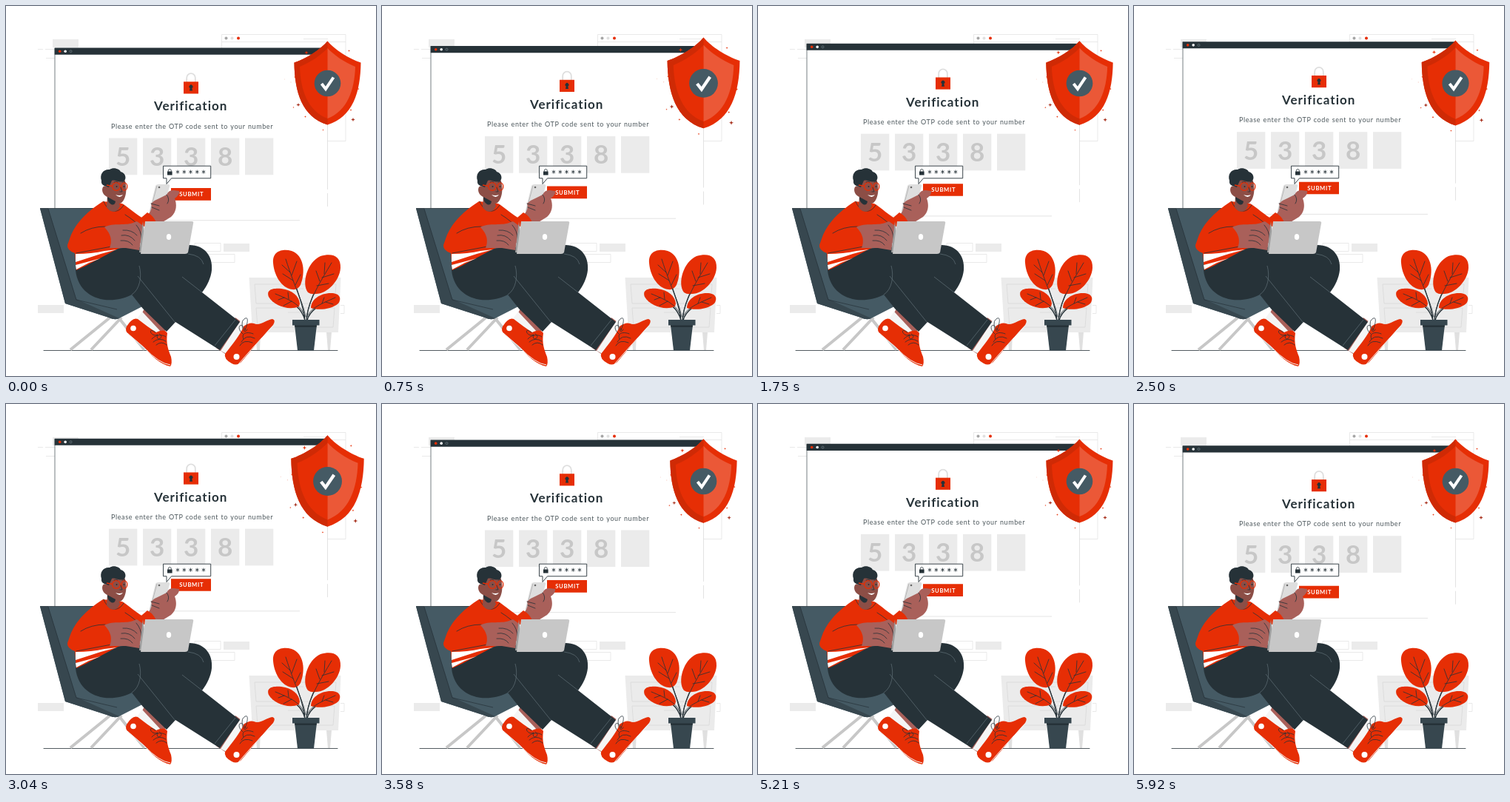
Animation of 500x500 px, one loop 5960 ms. Source, as an HTML page:

```html
<!DOCTYPE html>
<html lang="en">
<head>
<meta charset="utf-8">
<title>Verification</title>
<style>
  html, body { margin: 0; width: 100%; height: 100%; overflow: hidden; background: #fff; }
  svg { display: block; width: 100vw; height: 100vh; }
  text { font-family: Lato, "Open Sans", sans-serif; }
  .red { fill: #e62e05; }
  .dark { fill: #263238; }
  .slate { fill: #37474f; }
  .skin { fill: #a9605a; }
  .pale { fill: #ebebeb; }
  .white { fill: #fff; }
  .line { fill: none; stroke: #263238; stroke-width: .8; stroke-linecap: round; stroke-linejoin: round; }
  .faint { fill: none; stroke: #e4e4e4; stroke-width: .8; }
</style>
</head>
<body>
<svg viewBox="0 0 500 500">
  <g id="backdrop">
    <path class="pale" d="M63 45h35v11H63zM43 404h35v11H43zM294 321h35v11h-35z"/>
    <path class="faint" d="M43 58.5h7M53 58.5h13M54 70.5h12M255 320.5h35v11h-35zM270 335.5h39v11h-39zM452 404.5h5v11h-5"/>
    <path class="faint" d="M291.5 38.5H459V182.5H291.5zM291.5 48.5H459M402 44.5h33"/>
    <circle cx="297.500" cy="43.500" r="2" fill="#a6a6a6"/>
    <circle cx="305.500" cy="43.500" r="2" fill="#e0e0e0"/>
    <circle cx="314" cy="43.500" r="2" class="red"/>
    <path fill="#e0e0e0" d="M337 441h7l-1 24h-4zM433 441h7l-2 24h-3z"/>
    <path class="pale" d="M328.500 367H452.500L449 441H333z"/>
    <path fill="none" stroke="#d8d8d8" stroke-width=".8" d="M336 376H446L444 402H338zM338 408H444L442 434H340zM380 382h22M381 414h20"/>
    <path class="line" d="M51 465.500H448" stroke-width=".6"/>
  </g>

  <g id="panel">
    <path class="white" d="M66 57H434.500V290H66z"/>
    <path fill="none" stroke="#dcdcdc" stroke-width=".8" d="M434.500 66V248M434.500 253V271M66 289.700H397"/>
    <path fill="none" stroke="#555f64" stroke-width=".8" d="M66 57V290"/>
    <path class="dark" d="M65.700 56.500H434.500v9.200H65.700z"/>
    <circle cx="72.700" cy="61.200" r="1.800" class="red"/>
    <circle cx="80.200" cy="61.200" r="1.800" class="white"/>
    <circle cx="87.500" cy="61.200" r="1.500" fill="none" stroke="#6d7b82" stroke-width=".8"/>
    <path fill="none" stroke="#dedede" stroke-width="1.800" d="M244.200 103V97a5.800 5.800 0 0 1 11.600 0v6"/>
    <path class="red" d="M240 102.300h20v16.200h-20z"/>
    <path class="dark" d="M248.700 111a2.400 2.400 0 1 1 2.600 0l.7 3.600h-4z"/>
    <text class="dark" x="200" y="141.500" font-size="17" font-weight="700" letter-spacing="1">Verification</text>
    <text x="142" y="165.700" font-size="9" fill="#4a555a" letter-spacing=".62" word-spacing=".5">Please enter the OTP code sent to your number</text>
    <g id="digits" font-size="35" font-weight="700" text-anchor="middle"></g>
    <path class="red" d="M223 246h54v16.700h-54z"/>
    <text class="white" x="234.200" y="257.200" font-size="7.700" font-weight="700" letter-spacing=".65">SUBMIT</text>
  </g>

  <g id="chair">
    <path fill="none" stroke="#c7c7c7" stroke-width="4" d="M143 419L87 464.500M156 421L115 464.500M152 421L187 464.500"/>
    <path fill="#455a64" d="M46 273.500L124 273C140 275 153 285 160 300L196 400L153 422Q147 425 139 421L80 402z"/>
    <path class="slate" d="M46 273.500H57L95 396L153 422Q147 425 139 421L80 402z"/>
    <path fill="none" stroke="#263238" stroke-width=".7" d="M46 273.500H124M57 274L95 397L150 410"/>
  </g>

  <g id="person">
    <path class="skin" d="M188 407L217 436L207 450L178 426z"/>
    <path fill="#f5f5f5" d="M184 413L211 442L205 453L173 428z"/>
    <path class="red" d="M163 433Q171 420 178 423C187 430 195 436 203 441C209 438 215 437 218 442C216 455 219 464 223 474Q225 483 222 487C209 485 196 472 184 459L166 444Q160 439 163 433z"/>
    <path fill="none" stroke="#f5f5f5" stroke-width="1" d="M164 442L187 462Q207 483 222 485"/>
    <circle cx="172" cy="435.500" r="3.800" class="white"/>
    <path class="line" d="M197 450C203 443 212 444 216 447M199 454Q207 447 216 453M203 458Q210 452 217 458M202 441C190 432 196 449 205 444C201 455 216 448 207 443" stroke-width="1.200"/>

    <path class="skin" d="M310 421L322 430L296 470L284 462z"/>
    <path fill="#f5f5f5" d="M317 425L329 433L304 473L290 466z"/>
    <path class="red" d="M296 470C306 457 317 444 321 433Q329 427 335 429C343 433 352 424 360 423Q365 424 361 431C347 446 332 465 318 481Q312 487 305 483Q294 477 296 470z"/>
    <path fill="none" stroke="#f5f5f5" stroke-width="1" d="M314 484Q331 464 361 432"/>
    <circle cx="311.500" cy="474" r="4" class="white"/>
    <path class="line" d="M321 450C317 441 327 440 334 443M318 454Q324 443 336 449M316 459Q321 450 333 455M320 443C309 434 319 425 323 438C329 422 326 418 320 425C317 433 322 445 326 437" stroke-width="1.200"/>

    <path class="dark" d="M94 357C107 342 135 329 166 326L246 323C267 322 280 337 278 357C277 367 272 378 265 387L316 427L289 465L229 427L217 440L185 409L170 390C139 406 98 396 94 357z"/>
    <path fill="none" stroke="#607078" stroke-width=".7" d="M170 390C181 383 184 365 180 351M178 365L228 427M246 335Q264 337 267 349M265 387L238 366M282 459L310 424"/>

    <path class="red" d="M131 264C112 276 96 291 88 309L83 323Q82 330 93 334L95 357L108 351L151 328L185 319L184 297L193 291C180 286 166 272 157 267z"/>
    <path class="white" d="M94 335Q116 335 133 331L150 329L128 335L94 346z"/>
    <path class="white" d="M94 350L128 341L112 347L95 356z"/>
    <path class="line" d="M132 264C137 278 151 283 159 269M101 307Q115 298 134 298M95 334L148 324M161 282Q174 290 183 300"/>
    <path class="skin" d="M133 299C145 292 162 298 174 292Q181 289 186 295L180 330L162 327L140 327Q146 312 133 299z"/>
    <path class="line" d="M158 303Q170 302 177 310M156 310Q167 308 174 317M155 317Q166 316 171 323M176 296Q183 304 183 314" stroke-width=".6"/>

    <path fill="#8c4e46" d="M137 256L136 272C142 281 151 279 154 270L151 263z"/>
    <path fill="#8c4e46" d="M137 231L159 232C164 241 164 259 156 266Q151 269 145 265L137 258C127 254 129 240 136 244z"/>
    <path class="dark" d="M137 258L148 264Q147 270 142 268Q137 265 137 258z"/>
    <path class="dark" d="M129 236C126 227 132 220 140 221C146 217 154 221 155 224C161 225 164 233 159 237C152 239 147 234 143 236L139 245L133 243Q128 241 129 236z"/>
    <g fill="none" stroke="#e62e05" stroke-width="1.300">
      <circle cx="149" cy="244" r="5.300"/><ellipse cx="160" cy="244" rx="3.800" ry="5.200"/><path d="M136 242L144 243.500"/>
    </g>
    <path class="line" d="M146 238q3-2 5 0M157 238q3-1 4 0M155 245l2 6l-3 0" stroke-width=".7"/>
    <circle cx="149.500" cy="244" r="1" class="dark"/><circle cx="159.500" cy="244" r="1" class="dark"/>
    <path class="white" d="M148 255q5 2 10 0q-4 6-10 0z"/>

    <path fill="#dedede" d="M202 243Q203 241 206 241H219Q222 241 221 244L212 276Q211 279 208 279H195Q193 279 194 276z"/>
    <path fill="none" stroke="#a6a6a6" stroke-width=".7" d="M204 243L195 277"/>
    <circle cx="207" cy="245" r="1.300" fill="#666"/>
    <path class="skin" d="M191 283Q199 274 196 267Q201 262 207 260L217 255Q220 248 227 249L234 250Q235 255 228 260C231 268 231 278 223 285L210 293L199 293z"/>
    <path class="line" d="M196 267L207 270M197 272L207 276M217 255Q222 261 218 267" stroke-width=".6"/>
    <path class="red" d="M177 291L191 279Q200 284 203 293L188 299z"/>
    <path fill="#9e9e9e" d="M185 291L180 333L242 335L246 330L190 328z"/>
    <path fill="#c7c7c7" d="M188 291H251Q254 291 253 294L246 333Q245 335 242 335H182z"/>
    <ellipse cx="220" cy="312" rx="3.200" ry="4" class="white"/>
  </g>

  <g id="bubble">
    <path class="white" stroke="#263238" stroke-width=".9" d="M212.500 216.200H276.700V232.800H223.500L217 240.500V232.800H212.500z"/>
    <path class="dark" d="M218 223.500h6.600v5H218z"/>
    <path class="line" d="M219.300 223.500v-1a2 2 0 0 1 4 0v1"/>
    <path id="stars" class="line" stroke-width="1"/>
  </g>

  <g id="plant">
    <path fill="none" stroke="#263238" stroke-width="1.300" d="M404 425C402 400 392 388 384 350M406 425C408 400 420 380 434 353M404 425C400 408 388 400 366 392M407 425C410 411 424 404 443 395"/>
    <path class="red" d="M387 383C371 381 362 362 361 347C360 330 375 328 386 331C403 337 405 360 398 377Q394 384 387 383z"/>
    <path class="red" d="M408 387C399 375 407 346 425 338C441 333 453 338 452 354C451 371 434 389 419 389Q412 390 408 387z"/>
    <path class="red" d="M396 406C382 412 362 405 355 393C351 383 361 381 372 382C387 384 396 392 397 402z"/>
    <path class="red" d="M412 408C412 397 424 388 439 388C451 388 454 395 449 402C439 411 420 411 412 408z"/>
    <path class="line" stroke-width="1" d="M405 420C401 399 392 386 378 342M384 360l-11-10M388 371l-14-9M386 364l7-19M391 377l7-14M406 420C411 394 424 374 440 347M430 362l1-15M424 372l-5-14M427 367l16-5M420 378l16-3M404 420C399 404 386 398 364 389M376 394l-8 3M386 399l-11 6M382 396l-1-9M407 420C411 408 427 402 445 394M427 402l3-8M432 400l10 3"/>
    <path class="slate" d="M390 431H420L416 465.500H394z"/>
    <path class="dark" d="M390 431H420L419.500 434H390.500z"/>
    <path class="slate" d="M387 424H423.500V431.500H387z"/>
  </g>

  <g id="shield">
    <path class="red" d="M434.500 47.500C444 59 463 71 479.500 76.500C479 116 469 150 434.500 160.500C400 150 390 116 389.500 76.500C406 71 425 59 434.500 47.500z"/>
    <path fill="#cf2a05" d="M434.500 47.500V160.500C400 150 390 116 389.500 76.500C406 71 425 59 434.500 47.500z"/>
    <path class="red" d="M434.500 57V152C408 142 398 114 397 82C412 76 426 66 434.500 57z"/>
    <path fill="#eb5837" d="M434.500 57V152C461 142 471 114 472 82C457 76 443 66 434.500 57z"/>
    <circle cx="434.500" cy="104.500" r="17.800" fill="#455a64"/>
    <path fill="none" stroke="#fff" stroke-width="4" d="M426.500 105L432 112L442.500 96.500"/>
    <g id="sparks"></g>
  </g>
</svg>
<script>
  const PERIOD = 6000, LOOP = 5960;
  const byId = id => document.getElementById(id);

  byId('digits').innerHTML = ['5', '3', '3', '8', ''].map((digit, i) => {
    const x = 139 + 46 * i;
    return `<rect class="pale" x="${x}" y="178.500" width="38.300" height="49.700"/>
      <text x="${x + 19.200}" y="216" fill="#c7c7c7">${digit}</text>`;
  }).join('');

  const asterisk = x => `M${x} 222v4.400M${x - 1.900} 223.100l3.800 2.200M${x - 1.900} 225.300l3.800 -2.200`;
  byId('stars').setAttribute('d', [232, 240.800, 249.500, 258.300, 267].map(asterisk).join(''));

  // x, y, radius, colour
  const sparks = [
    [395, 133.500, 2.600, '#a52a16'], [469, 153.500, 2.800, '#a52a16'], [406, 63, 2.600, '#e62e05'],
    [463.500, 60.500, 1.500, '#e62e05'], [476, 112, 1.500, '#e62e05'], [466, 140.500, 1.500, '#e62e05'],
    [404.500, 149.500, 1.500, '#e62e05'], [428.500, 167.500, 1.300, '#e62e05'],
    [388.500, 137, 1.200, '#e62e05'], [390.500, 96, 1.400, '#e62e05'],
    [385, 103, .8, '#f0a492'], [376.500, 99, .8, '#f3c5ba']
  ];
  const spark = ([x, y, r, color]) => {
    const k = r * .25;
    return `<path fill="${color}" d="M${x} ${y - r}l${k} ${r - k}l${r - k} ${k}l${k - r} ${k}l${-k} ${r - k}l${-k} ${k - r}l${k - r} ${-k}l${r - k} ${-k}z"/>`;
  };
  byId('sparks').innerHTML = sparks.map(spark).join('');

  const beat = [[0, 1], [.1, 1.1], [.3, 1], [.4, 1], [.5, 1.1], [.6, 1], [1, 1]];
  function sample(keys, p) {
    const i = keys.findIndex(([at]) => at > p);
    const [a, from] = keys[i - 1], [b, to] = keys[i];
    return from + (to - from) * (p - a) / (b - a);
  }

  function draw(ms) {
    const p = ms % LOOP / PERIOD;
    const rise = 10 * (1 - Math.abs(1 - 2 * p));
    byId('panel').setAttribute('transform', `translate(0 ${-rise})`);
    byId('shield').setAttribute('transform',
      `translate(434 105) scale(${sample(beat, p)}) translate(-434 -105)`);
  }

  const start = performance.now();
  function tick() {
    draw(performance.now() - start);
    requestAnimationFrame(tick);
  }
  draw(0);
  requestAnimationFrame(tick);
</script>
</body>
</html>
```
